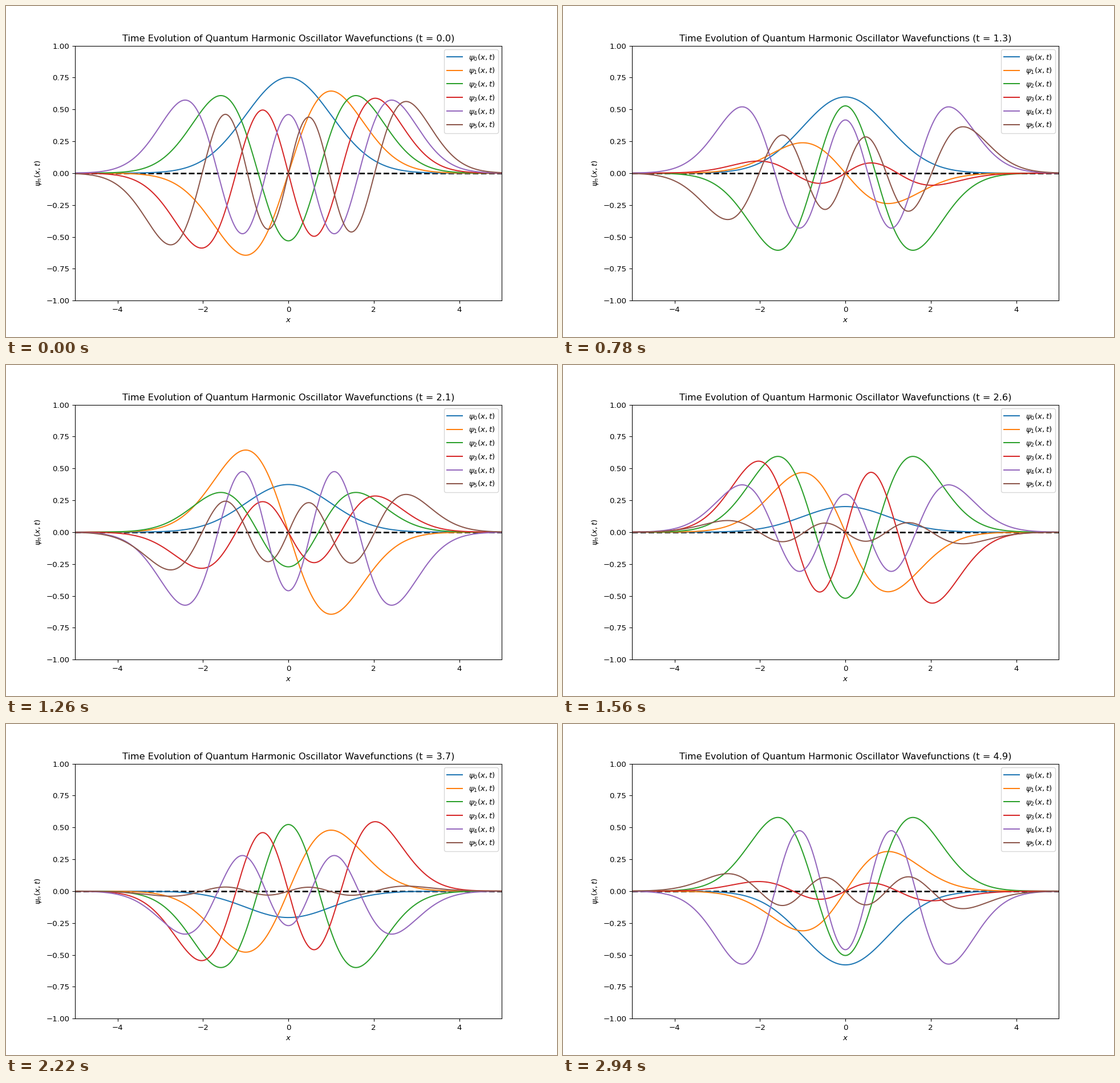
These frames come from a looping animation (966 by 580 pixels, 3000 ms). A matplotlib script:

```python
import math

import matplotlib.pyplot as plt
import numpy as np
from matplotlib.animation import FuncAnimation
from numpy.polynomial.hermite import hermval

LEVELS = 6
FRAMES = 50
INTERVAL = 60  # ms
DT = 0.1

x = np.linspace(-5, 5, 1000)


def eigenstate(n):
    """Normalised harmonic oscillator state, with m = omega = hbar = 1."""
    norm = 1 / math.sqrt(2**n * math.factorial(n) * math.sqrt(math.pi))
    return norm * hermval(x, [0] * n + [1]) * np.exp(-x**2 / 2)


states = [eigenstate(n) for n in range(LEVELS)]

fig, ax = plt.subplots(figsize=(10, 6.0042), dpi=96.6)  # 966 x 580 px
ax.axhline(0, color="black", lw=2, ls="--")
lines = [ax.plot(x, psi, label=rf"$\psi_{n}(x, t)$")[0]
         for n, psi in enumerate(states)]
ax.set_xlim(-5, 5)
ax.set_ylim(-1, 1)
ax.set_xlabel("$x$")
ax.set_ylabel(r"$\psi_n(x, t)$")
title = ax.set_title("")
ax.legend(loc="upper right")


def update(frame):
    t = frame * DT
    for n, (line, psi) in enumerate(zip(lines, states)):
        line.set_ydata(psi * math.cos((n + 0.5) * t))
    title.set_text("Time Evolution of Quantum Harmonic Oscillator "
                   f"Wavefunctions (t = {t:.1f})")
    return [*lines, title]


anim = FuncAnimation(fig, update, frames=FRAMES, interval=INTERVAL,
                     repeat=True, repeat_delay=0, blit=False)
plt.show()
```
